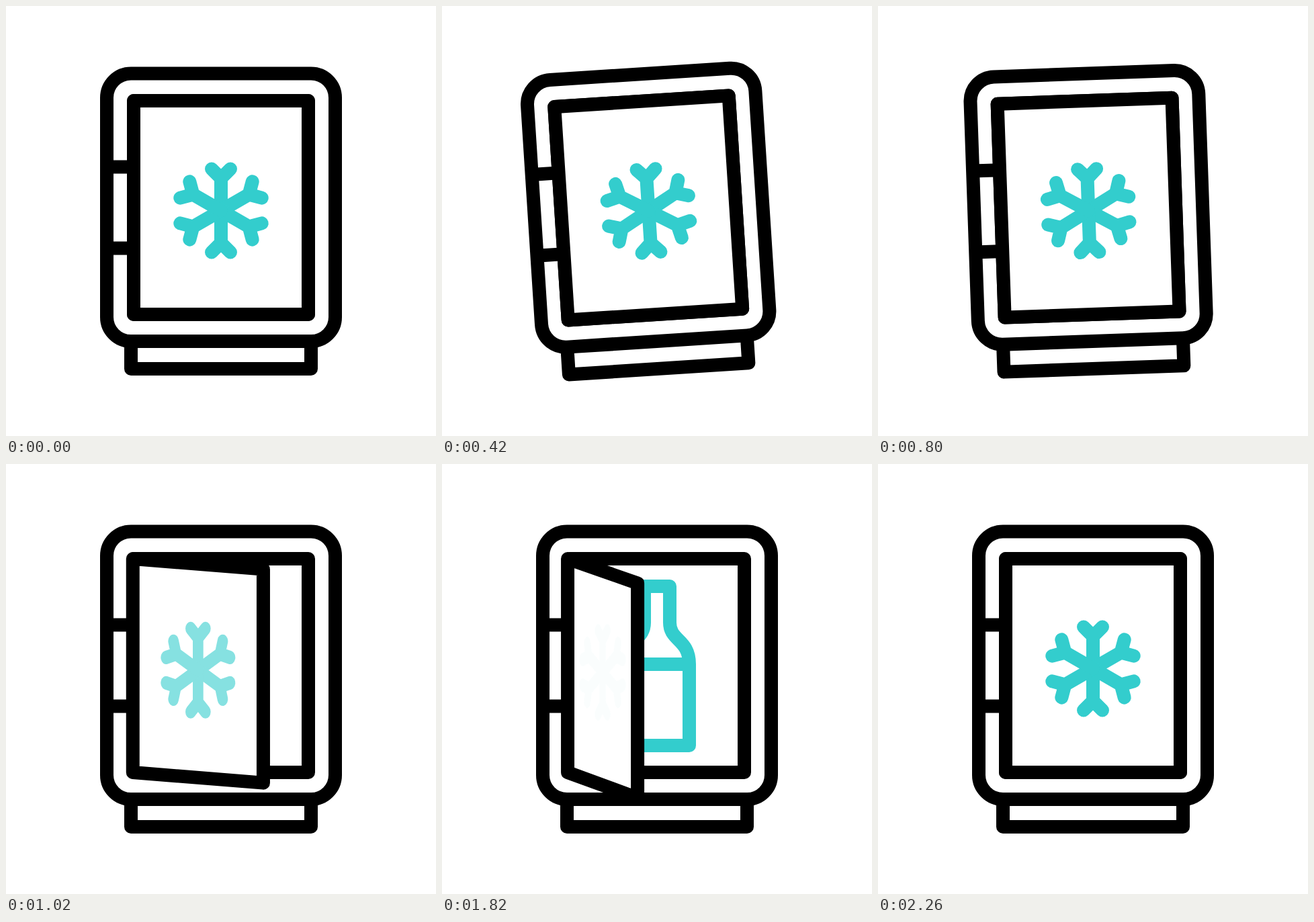
Animation, 640 px wide and 640 px high, one loop 2.4 s. Source, as an HTML page:

```html
<!DOCTYPE html>
<html lang="en">
<head>
<meta charset="utf-8">
<title>Mini fridge</title>
<style>
  html, body { margin: 0; width: 100%; height: 100%; overflow: hidden; background: #fff; }
  svg { display: block; width: 100%; height: 100%; }
</style>
</head>
<body>
<svg viewBox="0 0 640 640" fill="none" stroke="#000" stroke-width="20" stroke-linejoin="round">
  <defs>
    <path id="arm" d="M0 0V-48M-14 -62L0 -48L14 -62"/>
  </defs>
  <g id="fridge">
    <path d="M186 502V540H454V502"/>
    <rect x="150" y="100.5" width="340" height="398.5" rx="36"/>
    <path d="M150 239.5H190M150 360.5H190"/>
    <rect x="190" y="141" width="260" height="318"/>
    <path stroke="#33cdcd" d="M339 182V236C339 264 368 260 368 298V419H272V298C272 260 301 264 301 236V182ZM272 298H368"/>
    <path id="door" fill="#fff"/>
    <g id="flake" stroke="#33cdcd" stroke-linecap="round"></g>
  </g>
</svg>
<script>
const LOOP = 2400;
const PIVOT = '320 499';
const fridge = document.getElementById('fridge');
const door = document.getElementById('door');
const flake = document.getElementById('flake');

for (let i = 0; i < 6; i++) {
  const arm = document.createElementNS('http://www.w3.org/2000/svg', 'use');
  arm.setAttribute('href', '#arm');
  arm.setAttribute('transform', `rotate(${i * 60})`);
  flake.append(arm);
}

// Door poses: hinge x, free edge x, free edge top, free edge bottom, flake opacity
const CLOSED = [190, 450, 141, 459, 1];
const OPEN = [187, 287, 179, 497, 0];
const SWUNG = [190, 509, 101, 499, 1];

const tiltKeys = [[200, [0]], [397, [-4]], [597, [4]], [793, [-2]], [990, [0]]];
const doorKeys = [[880, CLOSED], [1200, OPEN], [1800, OPEN], [2060, SWUNG], [2260, CLOSED]];

const ease = u => u * u * (3 - 2 * u);

function sample(keys, t) {
  const next = keys.findIndex(([time]) => time > t);
  if (next === 0) return keys[0][1];
  if (next < 0) return keys[keys.length - 1][1];
  const [t0, a] = keys[next - 1];
  const [t1, b] = keys[next];
  const k = ease((t - t0) / (t1 - t0));
  return a.map((v, i) => v + (b[i] - v) * k);
}

function draw(t) {
  const [tilt] = sample(tiltKeys, t);
  const [hinge, edge, top, bottom, opacity] = sample(doorKeys, t);
  fridge.setAttribute('transform', `rotate(${tilt} ${PIVOT})`);
  door.setAttribute('d', `M${hinge} 141L${edge} ${top}V${bottom}L${hinge} 459Z`);

  const x = (hinge + edge) / 2;
  const y = 304.5 + ((top + bottom) / 2 - 300) * 0.15;
  const scaleX = 0.15 + 0.85 * (edge - hinge) / 260;
  const scaleY = (318 + bottom - top) / 636;
  flake.setAttribute('transform', `translate(${x} ${y}) scale(${scaleX} ${scaleY})`);
  flake.setAttribute('opacity', opacity);
}

const start = performance.now();
function frame() {
  draw((performance.now() - start) % LOOP);
  requestAnimationFrame(frame);
}
draw(0);
requestAnimationFrame(frame);
</script>
</body>
</html>
```
